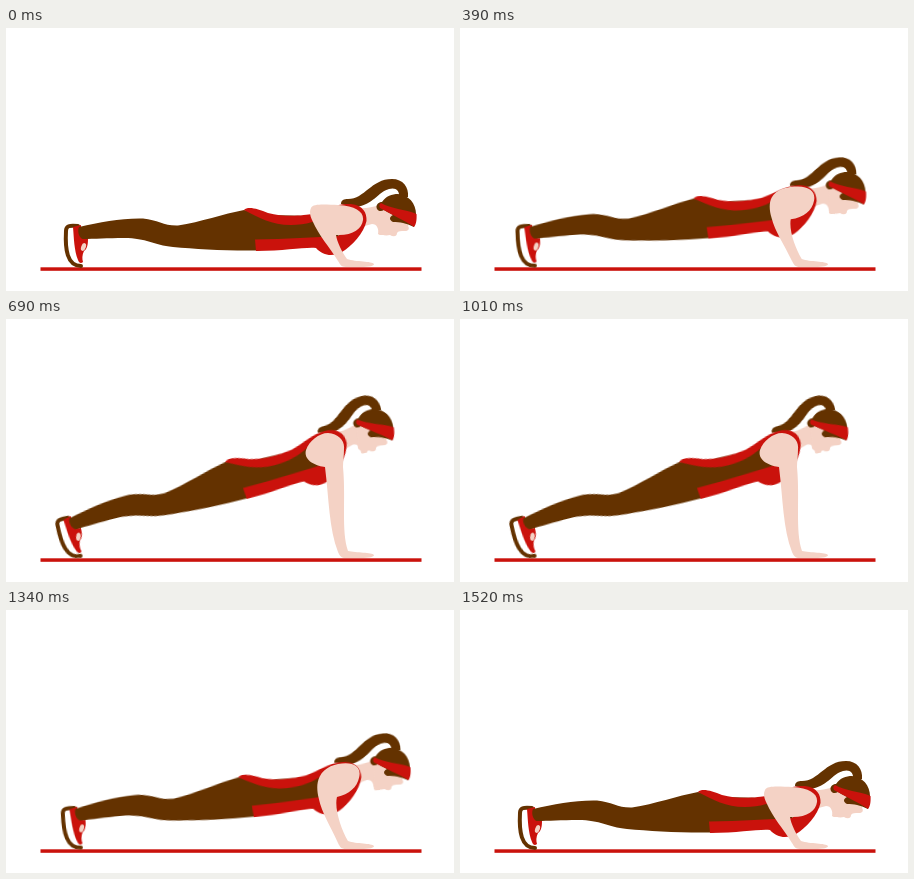
An HTML page for the animation above (1.83 s loop, 448x263 px).

```html
<!DOCTYPE html>
<html lang="en">
<head>
<meta charset="utf-8">
<title>Push-up</title>
<style>
  html, body { margin: 0; width: 100%; height: 100%; overflow: hidden; background: #fff; }
  svg { display: block; width: 100vw; height: 100vh; }
  .red { fill: #ca120c; }
  .brown { fill: #643200; }
  .skin { fill: #f4d2c5; }
  .sole { fill: none; stroke: #643200; stroke-width: 4; stroke-linecap: round; }

  /* The body pivots on the toes, the head stays nearly level,
     and the arm bends between shoulder and planted hand. */
  .body, .head, .arm { animation: lift 1830ms linear infinite; }
  .body { transform-origin: 70px 239px; --turn: -14deg; }
  .head { transform-origin: 391px 184px; --turn: 9deg; }
  .arm { animation-name: bend; }

  @keyframes lift {
    0%, 15.03%, 82.79%, 100% { transform: rotate(0deg); }
    37.43%, 56.56% { transform: rotate(var(--turn)); }
  }
  @keyframes bend {
    0%, 15.03%, 82.79%, 100% {
      d: path("M305 180C307 175 322 177 332 177C350 178 358 184 357 192C356 201 346 208 330 207C331 214 336 224 341 231C350 234 366 233 368 236C368 240 350 239 340 239C335 239 334 236 332 233C324 220 312 206 307 194C304 188 303 184 305 180Z");
    }
    23.54%, 72.82% {
      d: path("M314 166C319 156 330 152 340 152C351 152 355 158 353 166C351 176 343 183 331 186C328 198 335 219 342 231C350 234 366 233 368 236C368 240 350 239 340 239C335 239 334 237 332 233C324 215 316 203 313 188C311 180 311 172 314 166Z");
    }
    37.43%, 56.56% {
      d: path("M300 131C303 122 313 114 322 114C333 115 339 122 338 130C338 137 337 142 337 148C340 180 335 212 342 232C350 234 366 233 368 236C368 240 350 239 340 239C335 239 334 237 332 233C323 210 323 180 319 148C311 147 297 142 300 131Z");
    }
  }
</style>
</head>
<body>
<svg viewBox="0 0 448 263">
  <rect class="red" x="34.500" y="239.300" width="381" height="3.500"/>

  <g class="body">
    <!-- shoe -->
    <path class="sole" d="M72 198C63 197 60 198 60 203C59 221 61 238 75 238"/>
    <path class="red" d="M67 199L75 197C75 204 76 210 82 211C82 217 81 221 78 223C76 227 76 231 77 234C75 236 73 235 72 232C68 222 68 210 67 199Z"/>
    <ellipse class="skin" cx="77.500" cy="219" rx="2.300" ry="4" transform="rotate(20 77.500 219)"/>

    <!-- ponytail -->
    <path class="brown" d="M335 176C335 172 338 171 342 171C359 171 365 151 386 151C397 151 403 159 402 169L393 169C394 162 389 159 383 161C372 164 367 177 350 179Z"/>

    <!-- neck -->
    <path class="skin" d="M350 180C360 181 366 179 374 177L385 190L378 207C374 207 373 207 372 206C373 201 371 196 366 196L355 199Z"/>

    <g class="head">
      <path class="skin" d="M374 178L404 194L402 198C404 201 402 203 399 203C395 203 392 203 391 205C391 209 387 209 384 207C379 208 375 207 373 204Z"/>
      <path class="brown" d="M371 181C369 177 373 174 376 174C380 168 386 166 392 166C403 167 411 176 410 189L408 199C400 195 394 194 387 194C383 192 383 189 387 187C383 185 380 183 378 182C375 184 372 183 371 181Z"/>
      <path class="red" d="M375 175C385 181 399 181 410.500 186C411 192 410 197 408 199C400 193 386 187 374 180C373 178 373 176 375 175Z"/>
    </g>

    <!-- leggings, then top -->
    <path class="brown" d="M73 199C95 194 115 190 137 190.500C152 192 158 198 172 197.500C195 194 217 186 238 182L262 187L306 188L330 188L333 210L252 222.500C220 223 190 221 167 219C147 217 141 210 118 210C102 210 88 211 77 211C73 210 71 203 73 199Z"/>
    <path class="red" d="M238 182C242 178 252 181 262 185C280 190 300 187 306 186C320 182 330 175 345 176C357 177 361 185 360.500 193C358 205 346 218 336 224C327 229 317 228 310 220C298 219 280 223 250 223L249 211.500C280 211 310 209 333 208L322 187.500C312 193 300 197 285 197C265 197 254 190 238 182Z"/>
  </g>

  <path class="arm skin" d="M305 180C307 175 322 177 332 177C350 178 358 184 357 192C356 201 346 208 330 207C331 214 336 224 341 231C350 234 366 233 368 236C368 240 350 239 340 239C335 239 334 236 332 233C324 220 312 206 307 194C304 188 303 184 305 180Z"/>
</svg>
</body>
</html>
```
